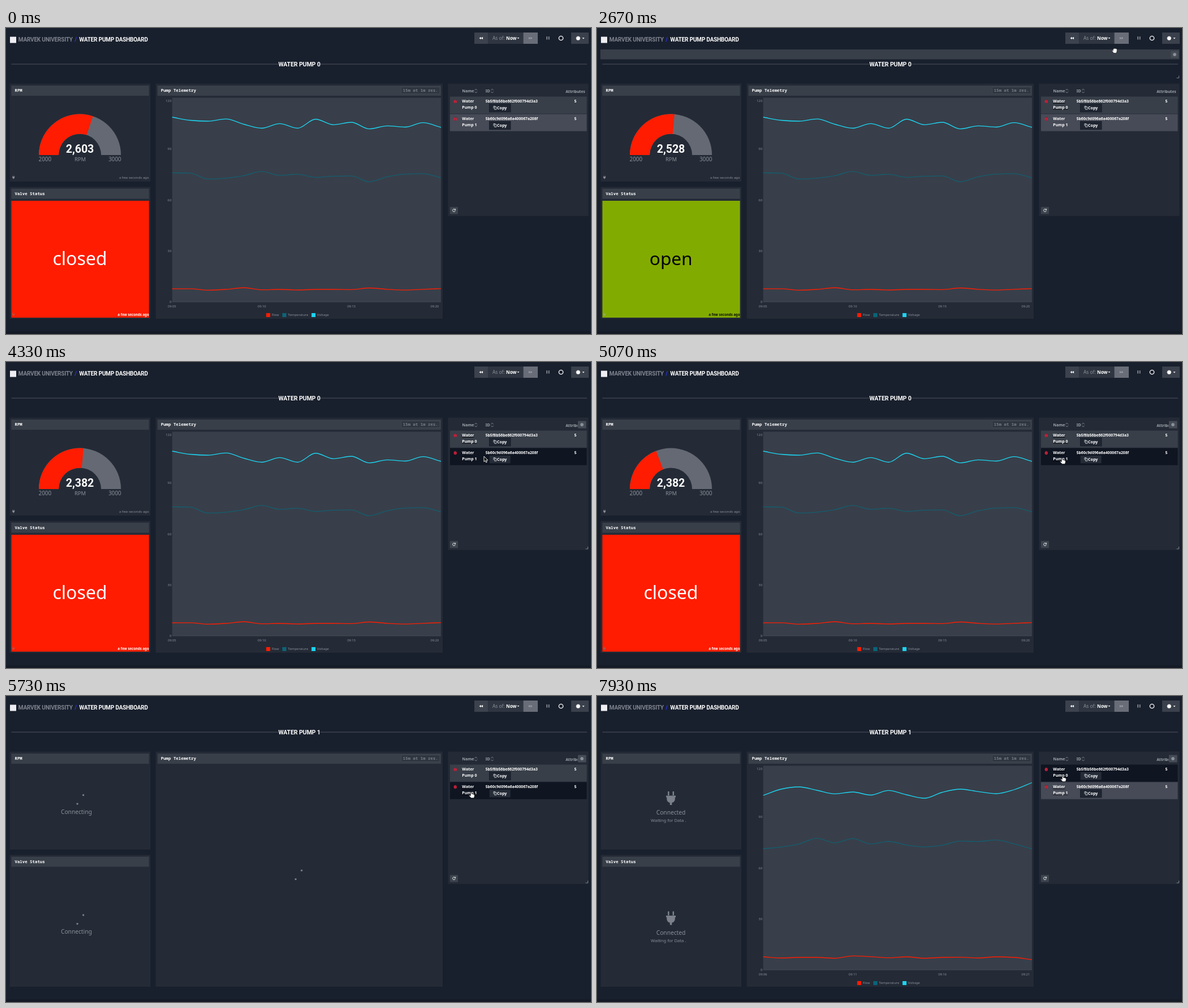
These frames come from a looping animation (1033x542 px, 8 s). An HTML page:

```html
<!DOCTYPE html>
<html lang="en">
<head>
<meta charset="utf-8">
<title>Water pump dashboard</title>
<style>
html, body { margin: 0; width: 100%; height: 100%; overflow: hidden; background: #19202d; }
svg { display: block; width: 1033px; height: 542px; font-family: "Noto Sans", "Open Sans", sans-serif; }
text { white-space: pre; }
.mono { font-family: "Noto Sans Mono", "DejaVu Sans Mono", monospace; font-weight: 600; }
.head { font-family: Roboto, "Open Sans", sans-serif; font-weight: 700; font-stretch: 75%; }
.b { font-weight: 600; }
.m { text-anchor: middle; }
.e { text-anchor: end; }
</style>
</head>
<body>
<svg id="stage" viewBox="0 0 1033 542"></svg>
<script>
const LOOP = 8000;
const OPEN = 1200, CLOSE = 4330, FOCUS = 2450, CLICK = 5390, CHART = 6000, ONLINE = 7150;
const RED = '#ff1c00', GREEN = '#82ab00', CYAN = '#1cd5f2', TEAL = '#0b6478';
const GREY = '#8b909a', WHITE = '#fff', PANEL = '#242b36', BAR = '#383f49';

const rect = (x, y, w, h, fill, more = '') =>
  `<rect x="${x}" y="${y}" width="${w}" height="${h}" fill="${fill}" ${more}/>`;
const text = (x, y, size, str, fill = WHITE, cls = '', more = '') =>
  `<text x="${x}" y="${y}" font-size="${size}" fill="${fill}" class="${cls}" ${more}>${str}</text>`;
const path = (d, fill, more = '') => `<path d="${d}" fill="${fill}" ${more}/>`;
const group = (id, body, more = '') => `<g id="${id}" ${more}>${body}</g>`;
const at = (x, y, s, body) => `<g transform="translate(${x} ${y}) scale(${s})">${body}</g>`;

const plug = fill => path('M-5.5-12v7h2.5v-7zM3-12v7h2.5v-7zM-8.5-4.5h17v3h-1.2v3a7 7 0 0 1-5.5 6.5v4h-3.6v-4a7 7 0 0 1-5.5-6.5v-3h-1.2z', fill);

function gear(x, y, r, fill) {
  let teeth = '';
  for (let i = 0; i < 4; i++)
    teeth += rect(-r * .25, -r, r * .5, r * 2, fill, `transform="rotate(${i * 45})"`);
  return at(x, y, 1, teeth + `<circle r="${r * .56}" fill="none" stroke="${fill}" stroke-width="${r * .45}"/>`);
}

const panel = (x, y, w, h) => rect(x, y, w, h, PANEL);
const titleBar = (x, y, w, str) => rect(x, y, w, 18, BAR) + text(x + 6, y + 11.3, 7.4, str, WHITE, 'mono');

// Smooth curve through evenly spaced values, without overshoot.
function curve(ys) {
  const step = 474.5 / 15, n = ys.length;
  const slope = i => ys[i + 1] - ys[i];
  const tan = i => {
    if (i === 0) return slope(0);
    if (i === n - 1) return slope(n - 2);
    const a = slope(i - 1), b = slope(i);
    return a * b <= 0 ? 0 : Math.sign(a) * Math.min(Math.abs(a), Math.abs(b), Math.abs(a + b) / 4) * 2;
  };
  let d = `M293.5 ${ys[0]}`;
  for (let i = 0; i < n - 1; i++) {
    const x = 293.5 + i * step;
    d += `C${x + step / 3} ${ys[i] + tan(i) / 3} ${x + step * 2 / 3} ${ys[i + 1] - tan(i + 1) / 3} ${x + step} ${ys[i + 1]}`;
  }
  return d;
}

const pumps = [
  {
    first: 5,
    volt: [158, 163.5, 165, 161.2, 170.5, 177.5, 169.3, 177.5, 161.5, 171.3, 167, 178.7, 173.3, 175.5, 167.7, 176],
    temp: [256.5, 257, 267.5, 266, 261.5, 254, 261, 259, 264.5, 262.5, 262, 272.3, 263.5, 258.7, 258, 265.3],
    flow: [462, 461.8, 464.3, 463, 460, 463.6, 463, 464, 463, 463, 463.4, 460.5, 462.8, 464.2, 462.8, 461.6]
  },
  {
    first: 6,
    volt: [176, 165, 161, 167, 173.4, 170, 175.5, 167.3, 175, 181, 170.5, 165, 169.3, 173, 166, 153.5],
    temp: [270.6, 267.5, 262, 252, 260, 252.5, 262, 257.6, 264, 267.3, 264.3, 257, 257.8, 255, 262, 270.6],
    flow: [462, 464, 463, 463, 464.5, 460.4, 461.7, 463.7, 462, 464.5, 463, 462.7, 464, 462, 463, 467]
  }
];

const line = (ys, stroke, w) => path(curve(ys), 'none', `stroke="${stroke}" stroke-width="${w}"`);

function series(p, i) {
  const ticks = [293, 451.7, 609.8, 757].map((x, k) =>
    text(x, 494.5, 5.8, '09:' + String(p.first + k * 5).padStart(2, '0'), GREY, 'm')).join('');
  return group('pump' + i, line(p.volt, CYAN, 1.3) + line(p.temp, TEAL, 1.1) + line(p.flow, RED, 1.3) + ticks);
}

function chart() {
  const labels = [[120, 131], [90, 216], [60, 306.5], [30, 396.7], [0, 487.2]]
    .map(([v, y]) => text(292, y, 5.8, v, GREY, 'e')).join('');
  const legend = [[459.5, 'Flow', RED], [488, 'Temperature', TEAL], [539.5, 'Voltage', CYAN]]
    .map(([x, s, c]) => rect(x, 505, 7, 7, c) + text(x + 9.8, 510.2, 5.9, s, GREY)).join('');
  return rect(293.5, 123.5, 474.5, 361.5, '#383f4a') + labels + legend +
    path('M293.5 485H768', 'none', 'stroke="#4a515b" stroke-width=".8"') + pumps.map(series).join('');
}

function row(i, id) {
  const y = 121.5 + i * 31;
  return rect(784, y, 241.5, 30.2, BAR, `id="row${i}"`) +
    at(793.3, y + 9, .4, `<ellipse rx="6.5" ry="8" cy="-1" fill="#d3203a"/>` +
      path('M-3-10v6M3-10v6M0-1v9', 'none', 'stroke="#5d2130" stroke-width="2"')) +
    group('link' + i, text(805.3, y + 10.7, 7, 'Water') + text(805.3, y + 21.2, 7, 'Pump ' + i), 'class="b"') +
    text(846.7, y + 10.7, 6.75, id, WHITE, 'b') +
    rect(853.5, y + 13, 37.5, 14.3, '#1f2632', `id="copy${i}" stroke="#141a25" stroke-width=".8"`) +
    path(`M862.7 ${y + 18.2}h3.2v4.6h-3.2zM861 ${y + 17}v4M861 ${y + 17}h3`, 'none', 'stroke="#fff" stroke-width=".7"') +
    text(867, y + 22.7, 7.1, 'Copy', WHITE, 'b') +
    text(1005.5, y + 10.7, 6.8, '5', WHITE, 'b m');
}

const sorter = x => path(`M${x - 2.3} 110.3l2.3-2.3 2.3 2.3M${x - 2.3} 112.7l2.3 2.3 2.3-2.3`, 'none', `stroke="${GREY}" stroke-width=".9"`);
const corner = (id, x, y) => group(id, path(`M${x} ${y}v-4M${x} ${y}h-4`, 'none', 'stroke="#7d828c" stroke-width="1"'));
const rewind = (x, fill, dir) => at(x, 18, dir, path('M0-2.3v4.6l-3.2-2.3zM3.3-2.3v4.6l-3.2-2.3z', fill));
const ago = (y, fill, cls) => text(252.5, y, 6.1, 'a few seconds ago', fill, cls + ' e');
const cubes = (x, y) => at(x, y, 1, rect(-2.6, -2.6, 5.2, 5.2, '#7b808a', 'class="cube"').repeat(2));

const waiting = y =>
  `<g class="linking">${cubes(123.5, y)}${text(97, y + 33.3, 10.2, 'Connecting', GREY, 'dots')}</g>` +
  `<g class="linked">${at(130.5, y + 5.5, 1, plug('#7b808a'))}${text(130.5, y + 34.5, 10.2, 'Connected', GREY, 'm')}` +
  `${text(95, y + 47.8, 7.6, 'Waiting for Data', GREY, 'dots')}</g>`;

const hand = path('M-1.8-4.2c1-.6 1.7 0 1.9.8l.7 1.8c.5-.5 1.2-.4 1.5.1.6-.4 1.2-.2 1.5.4.7-.2 1.2.2 1.3 1 .2 2.200-.2 4-1.500 5.300h-4.300l-3.700-3.600c-.6-.9.5-1.700 1.300-1.100l1.100.7z',
  WHITE, 'stroke="#15171c" stroke-width=".8"');
const grab = path('M-3.600-1.800c.2-1 1.200-.9 1.500-.2l-.3-1.300c.2-1.100 1.400-1 1.700-.1.2-1.200 1.500-1.200 1.700 0 .4-.8 1.500-.6 1.600.3.700-.5 1.400 0 1.400.8 0 2.800-.2 4.800-1.700 6.600h-3.900l-3.100-3.500c-.7-1 .5-1.700 1.300-1l.6.5z',
  WHITE, 'stroke="#15171c" stroke-width=".7"');
const arrow = path('M0 0v9.600l2.200-2 1.500 3.400 1.700-.8-1.500-3.200h3z', '#0a0a0c', 'stroke="#fff" stroke-width=".9"');

document.getElementById('stage').innerHTML =
  rect(0, 0, 1033, 542, '#19202d') + rect(0, 537.5, 1033, 4.5, '#141a26') +
  // top bar
  rect(7, 15.500, 11, 11, '#eeeef2') +
  text(21.800, 24.300, 10, 'MARVEK UNIVERSITY<tspan fill="#2a35ff" dx="3.500">/</tspan><tspan fill="#fff" dx="4.500">WATER PUMP DASHBOARD</tspan>', '#7f848f', 'head', 'letter-spacing="-.2"') +
  rect(827, 8, 24.500, 20, '#3c434e') + rect(851.500, 8, 62, 20, '#2f3641') + rect(913.500, 8, 25.500, 20, '#696d78') +
  rewind(838.800, WHITE, 1) + rewind(926.300, '#989ca5', -1) +
  text(859, 20.800, 8.300, 'As of:', GREY) + text(883, 20.800, 8.200, 'Now', WHITE, 'b') + path('M902.500 16.900h4l-2 2.200z', WHITE) +
  rect(954.300, 15, 1.700, 5.500, '#8b909a') + rect(957.800, 15, 1.700, 5.500, '#8b909a') +
  '<circle cx="980" cy="18" r="3.700" fill="none" stroke="#fff" stroke-width="1.300"/>' +
  rect(998, 8, 31, 20, '#3a414c') + gear(1010.300, 18.200, 3.700, WHITE) + path('M1017.500 17.200h4l-2 2.200z', WHITE) +
  // section title
  group('strip', rect(6, 38, 1022.500, 17.500, BAR) + rect(1013.500, 41, 13, 12, '#454c56') + gear(1020, 47, 3, GREY) + corner('c1', 1027.500, 88.500)) +
  path('M9.500 64H482M554 64H1026', 'none', 'stroke="#4c535d" stroke-width="1"') +
  text(518, 67.700, 10.500, '', WHITE, 'head m', 'id="title" letter-spacing="-.1"') +
  // gauge
  panel(6.500, 98.500, 248.500, 173.500) + titleBar(9.500, 102, 243, 'RPM') +
  group('gauge',
    path('M58 225a72.500 72.500 0 0 1 145 0h-35a37.500 37.500 0 0 0-75 0z', '#656973') + path('', RED, 'id="arc"') +
    text(130.500, 221.300, 19.500, '', WHITE, 'head m', 'id="rpm"') +
    text(57.500, 236, 9.900, '2000', GREY) + text(131, 236, 9.400, 'RPM', GREY, 'm') + text(203.500, 236, 9.900, '3000', GREY, 'e') +
    at(13.200, 264.500, .26, plug(GREY)) + ago(266.800, GREY, '')) +
  // valve
  panel(6.500, 281.500, 248.500, 233.500) + titleBar(9.500, 284.500, 243, 'Valve Status') +
  group('shut', rect(9.500, 306, 243, 207, RED) + text(130.500, 420, 32, 'closed', WHITE, 'm') +
    at(13.200, 507.300, .26, plug('#a8594f')) + ago(509.800, WHITE, 'b')) +
  group('open', rect(9.500, 306, 243, 207, GREEN) + text(130.700, 420, 31.500, 'open', '#000', 'm') +
    at(13.200, 507.300, .26, plug('#97b04a')) + ago(509.800, '#0c1000', 'b')) +
  group('wait', waiting(175.500) + waiting(388)) +
  // telemetry
  panel(264.500, 98.500, 506.500, 416.500) + titleBar(267.500, 102, 500.500, 'Pump Telemetry') +
  rect(698, 104.500, 68, 12, '#2f3640', 'stroke="#4a515b" stroke-width=".6"') +
  text(700.800, 113.300, 7.400, '15m at 1m res.', '#777c86', 'mono') +
  group('chart', chart()) + group('loading', cubes(509, 309)) +
  // device list
  panel(780.500, 98.500, 248, 234.500) +
  text(805.500, 114, 7, 'Name', '#a0a4ac', 'b') + sorter(829.800) + text(846.800, 114, 7, 'ID', '#a0a4ac', 'b') + sorter(858.500) +
  text(1022.500, 114.500, 6.700, 'Attributes', '#a0a4ac', 'b e') +
  row(0, '5b5f8b56be662f000794d3a3') + row(1, '5b60c9d096a6a400067a208f') +
  rect(784, 317, 14, 12.500, '#3d444e') +
  path('M793 321.600a2.400 2.400 0 1 0 .4 2M793.600 320.200v2h-2', 'none', 'stroke="#fff" stroke-width=".9"') +
  group('tools', rect(1009.500, 98.500, 19, 22, PANEL) + rect(1010, 104.500, 14.500, 13, '#454c56') + gear(1017, 111, 3, GREY) + corner('c2', 1027.500, 331)) +
  group('cursor', group('arrow', arrow) + group('hand', hand, 'transform="translate(1.200 3.500)"') + group('grab', grab));

const $ = id => document.getElementById(id);
const all = cls => [...document.querySelectorAll('.' + cls)];
const show = (el, on) => el.style.display = on ? '' : 'none';
const parts = { cubes: all('cube'), dots: all('dots'), linking: all('linking'), linked: all('linked') };
parts.dots.forEach(el => el.dataset.base = el.textContent);

const clamp = v => Math.max(0, Math.min(1, v));
const ease = p => p * p * (3 - 2 * p);

// time, x, y of the pointer
const track = [
  [1330, 866, 100], [1600, 869, 29], [1870, 890, 4], [2480, 900, 4], [2700, 915, 42],
  [3300, 931, 44], [3640, 931, 44], [4200, 846, 164], [4330, 844, 167], [4850, 821, 172],
  [5950, 821, 172], [6470, 837, 149], [7100, 838, 146], [7650, 835, 145], [7870, 822, 143]
];

function pointer(t) {
  let i = 0;
  while (i < track.length - 2 && t > track[i + 1][0]) i++;
  const [ta, xa, ya] = track[i], [tb, xb, yb] = track[i + 1];
  const k = ease(clamp((t - ta) / (tb - ta)));
  return [xa + (xb - xa) * k, ya + (yb - ya) * k];
}

// Two squares wander round the corners of a larger square.
function wander(el, t, shift) {
  const p = (((t - CLICK - 5) / 1800 + shift) % 1 + 1) % 1 * 4;
  const leg = Math.floor(p), k = ease(p - leg), side = 15.5;
  const x = [k, 1, 1 - k, 0][leg] * side, y = [0, k, 1, 1 - k][leg] * side;
  const size = leg % 2 ? .5 + k / 2 : 1 - k / 2;
  el.setAttribute('transform', `translate(${x} ${y}) rotate(${-90 * (leg + k)}) scale(${size})`);
}

function arc(value) {
  const a = Math.PI * (value - 2000) / 1000, c = Math.cos(a), s = Math.sin(a);
  const p = r => `${130.5 - r * c} ${225 - r * s}`;
  return `M58 225A72.5 72.5 0 0 1 ${p(72.5)}L${p(37.5)}A37.5 37.5 0 0 0 93 225z`;
}

function draw(t) {
  const live = t < CLICK, open = t >= OPEN && t < CLOSE, online = t >= ONLINE;
  const turn = from => ease(clamp((t - from) / 400));

  show($('gauge'), live);
  show($('open'), live && open);
  show($('shut'), live && !open);
  show($('wait'), !live);
  show($('loading'), !live && t < CHART);
  show($('chart'), live || t >= CHART);
  show($('pump0'), live);
  show($('pump1'), !live);
  $('title').textContent = 'WATER PUMP ' + (live ? 0 : 1);
  $('rpm').textContent = t < OPEN ? '2,603' : t < CLOSE ? '2,528' : '2,382';
  $('arc').setAttribute('d', arc(2603 - 75 * turn(OPEN) - 146 * turn(CLOSE)));

  parts.linking.forEach(el => show(el, !online));
  parts.linked.forEach(el => show(el, online));
  const count = Math.floor(Math.max(0, t - (online ? ONLINE : CLICK)) / 500) % 4;
  parts.dots.forEach(el => el.textContent = el.dataset.base + (count ? ' ' + '.'.repeat(count) : ''));
  parts.cubes.forEach((el, i) => wander(el, t, i % 2 / 2));

  const [x, y] = pointer(t), active = t > FOCUS;
  const strip = active && y > 38 && y < 92, list = active && y > 98;
  const over = !list || y < 121.5 ? -1 : t > 6530 || (y < 152 && t < 5000) ? 0 : 1;
  const link = over >= 0 && x < 831;
  const focus = !active ? -1 : live ? 0 : 1;
  show($('strip'), strip);
  show($('tools'), list);
  [0, 1].forEach(i => {
    $('row' + i).setAttribute('fill', over === i ? '#0f1521' : i ? '#474b57' : '#383f49');
    $('copy' + i).setAttribute('fill', over === i ? '#252c38' : '#1f2632');
    $('link' + i).style.textDecoration = focus === i || (link && over === i) ? 'underline' : 'none';
  });

  const grabbing = strip && y < 56;
  show($('cursor'), t >= track[0][0]);
  $('cursor').setAttribute('transform', `translate(${x} ${y})`);
  show($('hand'), link);
  show($('grab'), grabbing);
  show($('arrow'), !link && !grabbing);
}

const start = performance.now();
function tick() {
  draw((performance.now() - start) % LOOP);
  requestAnimationFrame(tick);
}
tick();
</script>
</body>
</html>
```
